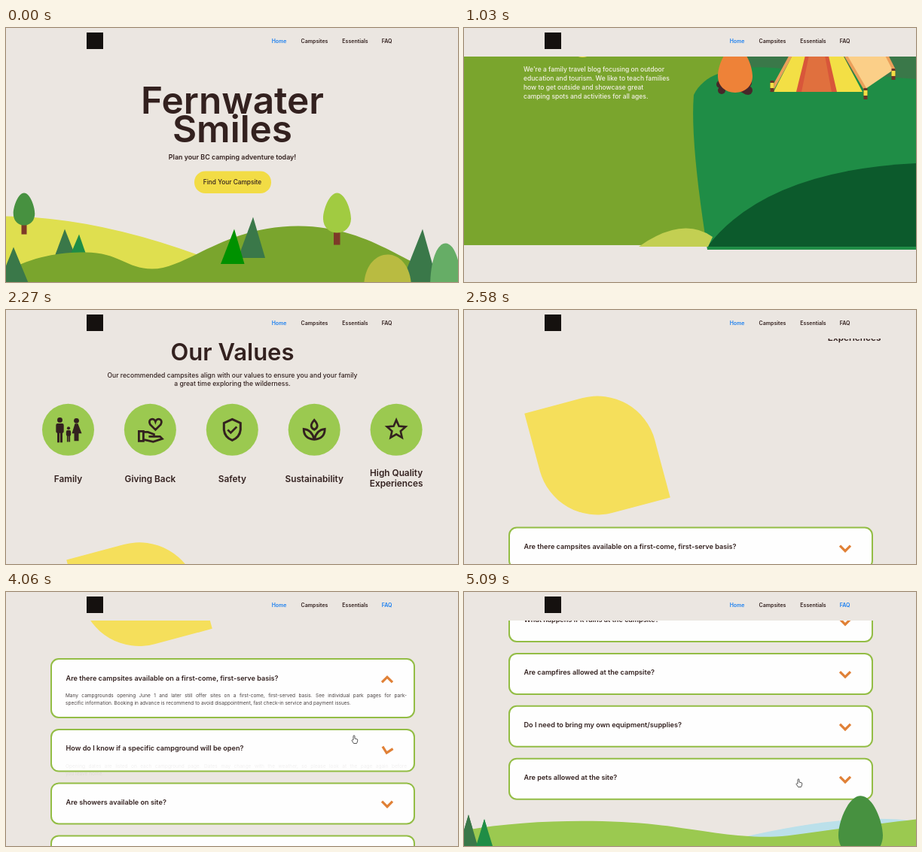
Animation of 600 by 338 pixels, one loop 5.12 s. Source, as an HTML page:

```html
<!DOCTYPE html>
<html lang="en">
<head>
<meta charset="utf-8">
<title>Camping site walkthrough</title>
<style>
html, body { margin: 0; width: 100%; height: 100%; overflow: hidden; background: #ebe6e1; }
svg { display: block; width: 600px; height: 338px; font-family: Inter, "Open Sans", sans-serif; }
.answer { font-size: 6.5px; line-height: 10px; color: #484040; text-align: justify; text-align-last: justify; }
.answer div:last-child { text-align-last: left; }
</style>
</head>
<body>
<svg id="stage" viewBox="0 0 600 338" xmlns="http://www.w3.org/2000/svg"></svg>
<script>
const LOOP = 5120;
const INK = '#33211f', PINE = '#3a7849', FERN = '#1f8d46', HILL = '#7aa52d',
      LEAF = '#479140', LIME = '#9bc950', SAND = '#ebe6e1', SKY = '#bbe0ea',
      YELLOW = '#f5df5b', BLUE = '#1a7ff0', ORANGE = '#e08036';

// Drawing helpers
const text = (x, y, size, s, { fill = INK, weight = 500, anchor = 'middle', id = '' } = {}) =>
  `<text x="${x}" y="${y}" font-size="${size}" font-weight="${weight}" fill="${fill}" text-anchor="${anchor}" id="${id}">${s}</text>`;
const lines = (x, y, step, size, list, opt) =>
  list.map((s, i) => text(x, y + i * step, size, s, opt)).join('');
const shape = (d, fill) => `<path d="${d}" fill="${fill}"/>`;
const stroke = (d, color, width) =>
  `<path d="${d}" fill="none" stroke="${color}" stroke-width="${width}"/>`;
const rect = (x, y, w, h, fill, r = 0) =>
  `<rect x="${x}" y="${y}" width="${w}" height="${h}" rx="${r}" fill="${fill}"/>`;
const dot = (x, y, r, fill) => `<circle cx="${x}" cy="${y}" r="${r}" fill="${fill}"/>`;
const group = (x, y, body, id = '') => `<g id="${id}" transform="translate(${x} ${y})">${body}</g>`;
const pine = (x, y, x1, x2, base, fill) => shape(`M${x} ${y}L${x1} ${base}H${x2}Z`, fill);
const egg = (x, y, w, h, fill) => {
  const side = k => `C${x + k * .28 * w} ${y} ${x + k * .5 * w} ${y + .42 * h} ${x + k * .5 * w} ${y + .64 * h}` +
    `S${x + k * .28 * w} ${y + h} ${x} ${y + h}`;
  return shape(`M${x} ${y}${side(1)}M${x} ${y}${side(-1)}`, fill);
};

const hero =
  shape('M0 251Q120 252 262 305V346H0Z', '#dfdf4f') +
  rect(20.5, 260, 7, 15, '#7d3a28') + egg(24, 220, 28.5, 43, LEAF) +
  pine(78, 268, 64, 93, 306, PINE) + pine(97, 275, 86, 106, 301, FERN) +
  shape('M0 325C35 304 72 299 105 299C150 299 160 321 194 321C240 321 290 264 388 264C470 264 520 306 556 319Q580 330 600 334V347H0Z', HILL) +
  pine(328, 252, 308, 344, 306.5, PINE) + pine(303, 268, 285, 316.5, 314.5, '#009100') +
  rect(435, 270, 8.5, 19, '#7d3a28') + egg(439.5, 220, 37, 53, '#a1cb41') +
  pine(10, 292, -12, 32.5, 346.5, PINE) + pine(553, 268, 522, 575, 346.5, PINE) +
  shape('M475 346.5C475 287 538 287 538 346.5Z', '#b9bb41') +
  shape('M563 346.5C563 267 604 267 604 346.5Z', '#66ad66') +
  lines(300.5, 114, 38, 49.5, ['Fernwater', 'Smiles'], { weight: 600 }) +
  text(300.5, 175.5, 8.9, 'Plan your BC camping adventure today!', { weight: 600 }) +
  rect(250, 191, 102, 29.5, '#f2dc45', 14.5) +
  text(300.5, 208.7, 8.3, 'Find Your Campsite');

const about =
  rect(0, 110, 600, 429, HILL) +
  shape('M366 304C395 232 455 182 507 182Q560 183 601 212V420H366Z', PINE) +
  shape('M305 339C320 308 362 300 410 303L600 318V545H323Q300 400 305 339Z', FERN) +
  shape('M323 541Q400 440 600 430V541Z', '#0c5a2c') +
  shape('M232 541Q290 500 330 528L324 541Z', '#c3cf52') +
  // tent
  shape('M469 222L517 197L571 305L533 331Z', '#fbcf88') +
  stroke('M468 223L516 198L571 306', '#eca05a', 4) +
  shape('M469 222L411 335H529Z', '#f3df45') +
  shape('M469 222L441 335H495Z', '#d8563a') + shape('M469 232L448 335H488Z', '#e0703e') +
  stroke('M408 334L469 222L533 332', '#eca05a', 4) +
  [[406.5, 320], [530.5, 330], [567.5, 304]].map(([x, y]) =>
    rect(x, y, 5, 15, '#6b3527') + rect(x, y + 3, 5, 7, '#f3df45')).join('') +
  // campfire
  stroke('M363 327L377 322M377 334L364 327', '#47282a', 11) +
  dot(376, 323, 6, '#47282a') + dot(377, 333, 6, '#47282a') +
  dot(340, 325, 5, '#47282a') + dot(342, 333, 5, '#47282a') +
  egg(360, 275, 46, 61, '#ee8238') +
  text(79, 215, 39.5, 'Hi! We\'re', { fill: SAND, anchor: 'start' }) +
  text(79, 252, 42, 'Fernwater', { fill: '#f2dc45', anchor: 'start' }) +
  text(288, 288, 41.5, 'Smiles!', { fill: '#f2dc45', anchor: 'end' }) +
  lines(79, 308.5, 12, 8.5, [
    'We\'re a family travel blog focusing on outdoor',
    'education and tourism. We like to teach families',
    'how to get outside and showcase great',
    'camping spots and activities for all ages.'
  ], { fill: '#f4f1e6', anchor: 'start' });

const card = (x, fill, y, title, body) =>
  rect(x, 136, 161.5, 186, fill, 9) +
  lines(x + 80.5, y, 17, 11.6, title, { weight: 700 }) +
  lines(x + 80.5, y + title.length * 17 + .5, 11.8, 7.7, body, { weight: 400 });

const features =
  card(32, YELLOW, 223.5, ['Quickly overview', 'a campsite'],
    ['Easily find a suitable', 'campsite for you and your', 'family from a curated list of', 'campsites.']) +
  stroke('M93 169.2H103M93 179H103M93 189H112', INK, 4) +
  '<circle cx="117" cy="175" r="8" fill="none" stroke="#33211f" stroke-width="4"/>' +
  stroke('M122 180L131 189', INK, 4) +
  card(220, '#f2b067', 217, ['Easily view prices', 'and booking links'],
    ['Find the campsite that suits', 'your needs and budget.']) +
  '<circle cx="300.5" cy="175" r="15.3" fill="none" stroke="#33211f" stroke-width="3.6"/>' +
  text(300.5, 183.3, 23, '$', { weight: 600 }) +
  card(407.5, SKY, 221, ['Plan for activities'],
    ['Main activities clearly listed', 'for each campsite for you to', 'plan your trip.']) +
  dot(490, 170, 3.2, INK) + dot(494, 178, 2.6, INK) +
  stroke('M484 168V176L489 179L495 180', INK, 2.8) +
  shape('M484 175L494 179L493 190L482 188Z', INK) +
  stroke('M484 186L481 194M491 187L495 191L492 198', INK, 2.8);

const person = (x, y, s) => group(x, y,
  dot(0, -13 * s, 3 * s, INK) + rect(-4.5 * s, -9 * s, 9 * s, 11 * s, INK, 2) +
  rect(-3 * s, 0, 2.6 * s, 13 * s, INK) + rect(.4 * s, 0, 2.6 * s, 13 * s, INK));
const star = Array.from({ length: 10 }, (_, i) => {
  const a = i * Math.PI / 5, r = i % 2 ? 6 : 13;
  return `${i ? 'L' : 'M'}${Math.sin(a) * r} ${-Math.cos(a) * r}`;
}).join('') + 'Z';
const icons = [
  person(-11, 2, 1.15) + person(.5, 7, .7) + dot(11, -12, 3.4, INK) +
    shape('M9 -8H13L18 5H14V15H8V5H5Z', INK),
  stroke('M7 0L0 -7C-4 -14 5 -17 7 -11C9 -17 18 -14 14 -7Z', INK, 2.8) +
    stroke('M-15 2V15H-9V2ZM-9 3H-3L5 6V9H-2M5 9H13L16 12L4 16L-9 13', INK, 2.8),
  stroke('M0 -14L11 -9V0Q10 10 0 14Q-10 10 -11 0V-9Z', INK, 3) + stroke('M-6 0L-2 4L6 -4', INK, 2.8),
  stroke('M0 -13Q-8 -4 0 0Q8 -4 0 -13ZM0 13Q-14 12 -14 -1Q-3 0 0 13Q3 0 14 -1Q14 12 0 13Z', INK, 2.8),
  stroke(star, INK, 2.6)
];
const labels = [['Family'], ['Giving Back'], ['Safety'], ['Sustainability'], ['High Quality', 'Experiences']];
const values =
  text(300.5, 68, 31, 'Our Values', { weight: 600 }) +
  lines(300.5, 91, 10.3, 8.6, [
    'Our recommended campsites align with our values to ensure you and your family',
    'a great time exploring the wilderness.']) +
  labels.map((label, i) => group(82.5 + i * 108.9, 160,
    dot(0, 0, 34.5, LIME) + icons[i] +
    lines(0, label.length > 1 ? 62 : 69.5, 14, 11.8, label, { weight: 600 }))).join('') +
  // leaf: a square with two opposite corners rounded
  `<path transform="translate(177 389) rotate(-15)" fill="${YELLOW}" d="M-79 -79H0A79 79 0 0 1 79 0V79H0A79 79 0 0 1 -79 0Z"/>`;

const questions = [
  'Are there campsites available on a first-come, first-serve basis?',
  'How do I know if a specific campground will be open?',
  'Are showers available on site?',
  'What happens if it rains at the campsite?',
  'Are campfires allowed at the campsite?',
  'Do I need to bring my own equipment/supplies?',
  'Are pets allowed at the site?'
];
const answers = [
  ['Many campgrounds opening June 1 and later still offer sites on a first-come, first-served basis. See individual park pages for park-',
    'specific information. Booking in advance is recommend to avoid disappointment, fast check-in service and payment issues.'],
  ['Opening dates are listed on each campground page. Dates may change with the weather, so please look at the page again before',
    'you leave home.']
];
const faq = questions.map((q, i) => group(0, 0,
  `<rect id="box${i}" x="60" width="482" height="54" rx="10" fill="#fefefe" stroke="#93bd45" stroke-width="2"/>` +
  text(79.5, 28.5, 9.15, q, { weight: 600, anchor: 'start' }) +
  `<path id="arrow${i}" d="M-7 -3.5L0 3.5L7 -3.5" fill="none" stroke="${ORANGE}" stroke-width="3.2"/>` +
  (answers[i] ? `<foreignObject id="answer${i}" x="79" y="43.5" width="453" height="24"><div class="answer">` +
    answers[i].map(a => `<div>${a}</div>`).join('') + '</div></foreignObject>' : ''),
  'item' + i)).join('');

const footer =
  shape('M366 328Q470 304 540 302.5Q575 302 601 306V340H366Z', SKY) +
  pine(6, 297, -8, 20, 345, PINE) + pine(27, 303, 15, 39, 342, FERN) +
  shape('M0 318C90 302 200 303 270 312C340 322 380 330 430 325C490 317 540 310 601 303V420H0Z', LIME) +
  pine(6, 297, -8, 20, 345, PINE) + pine(27, 303, 15, 39, 342, FERN) +
  egg(526.5, 272, 59, 82, LEAF);

const nav = { weight: 600 };
const header =
  rect(0, 0, 600, 38, SAND) + rect(107, 6, 22, 22, '#15110f') +
  text(362.5, 19.6, 6.9, 'Home', { weight: 600, fill: BLUE }) +
  text(409.5, 19.6, 7, 'Campsites', nav) + text(463.5, 19.6, 7, 'Essentials', nav) +
  text(505.7, 19.6, 7, 'FAQ', { weight: 600, id: 'faqLink' });

const hand = '<path d="M-2 1V-4.5Q-1 -6 0 -4.5V-1L3.5 0Q4 1 3.5 3L2.5 5.5H-1.5L-4 1.5Q-3.5 0 -2 1Z" ' +
  'fill="#fff" stroke="#444" stroke-width=".9" stroke-linejoin="round"/>';

const stage = document.getElementById('stage');
stage.innerHTML = rect(0, 0, 600, 338, SAND) +
  group(0, 0, hero + group(0, 236, about) + group(0, 740, features) + group(0, 1090, values) +
    group(0, 1486, faq) + group(0, 0, footer, 'footer'), 'page') +
  header + group(0, 0, hand, 'hand');

const el = id => document.getElementById(id);
const move = (id, x, y, more = '') => el(id).setAttribute('transform', `translate(${x} ${y}) ${more}`);
const clamp = v => Math.max(0, Math.min(1, v));

// Linear track through [time, value] points
const track = (points, t) => {
  let v = points[0][1];
  for (let i = 1; i < points.length; i++) {
    const [t0, a] = points[i - 1], [t1, b] = points[i];
    if (t >= t0) v = a + (b - a) * clamp((t - t0) / (t1 - t0));
  }
  return v;
};
const scroll = [[0, 0], [520, 236], [1550, 740], [2270, 1090], [2900, 1486], [4360, 1486], [5120, 1834]];
const handX = [[3050, 506], [3350, 488], [3650, 484], [4000, 463], [4350, 463], [5090, 445]];
const handY = [[3050, 50], [3350, 120], [3650, 122], [4000, 196], [4350, 196], [5090, 254]];
const openAt = [3400, 4040];

function draw(t) {
  move('page', 0, -track(scroll, t));
  let shift = 0;
  questions.forEach((_, i) => {
    const p = i in openAt ? clamp((t - openAt[i]) / 300) : 0;
    move('item' + i, 0, 89 + i * 69.9 + shift);
    el('box' + i).setAttribute('height', 54 + 24 * p);
    move('arrow' + i, 506, 27.7, `rotate(${180 * p})`);
    if (answers[i]) el('answer' + i).setAttribute('opacity', p);
    shift += 24 * p;
  });
  move('footer', 0, 1772 + shift);
  el('faqLink').setAttribute('fill', t >= 2700 ? BLUE : INK);
  el('hand').setAttribute('visibility', t >= 3050 ? 'visible' : 'hidden');
  move('hand', track(handX, t), track(handY, t));
}

const start = performance.now();
function tick() {
  draw((performance.now() - start) % LOOP);
  requestAnimationFrame(tick);
}
tick();
</script>
</body>
</html>
```
